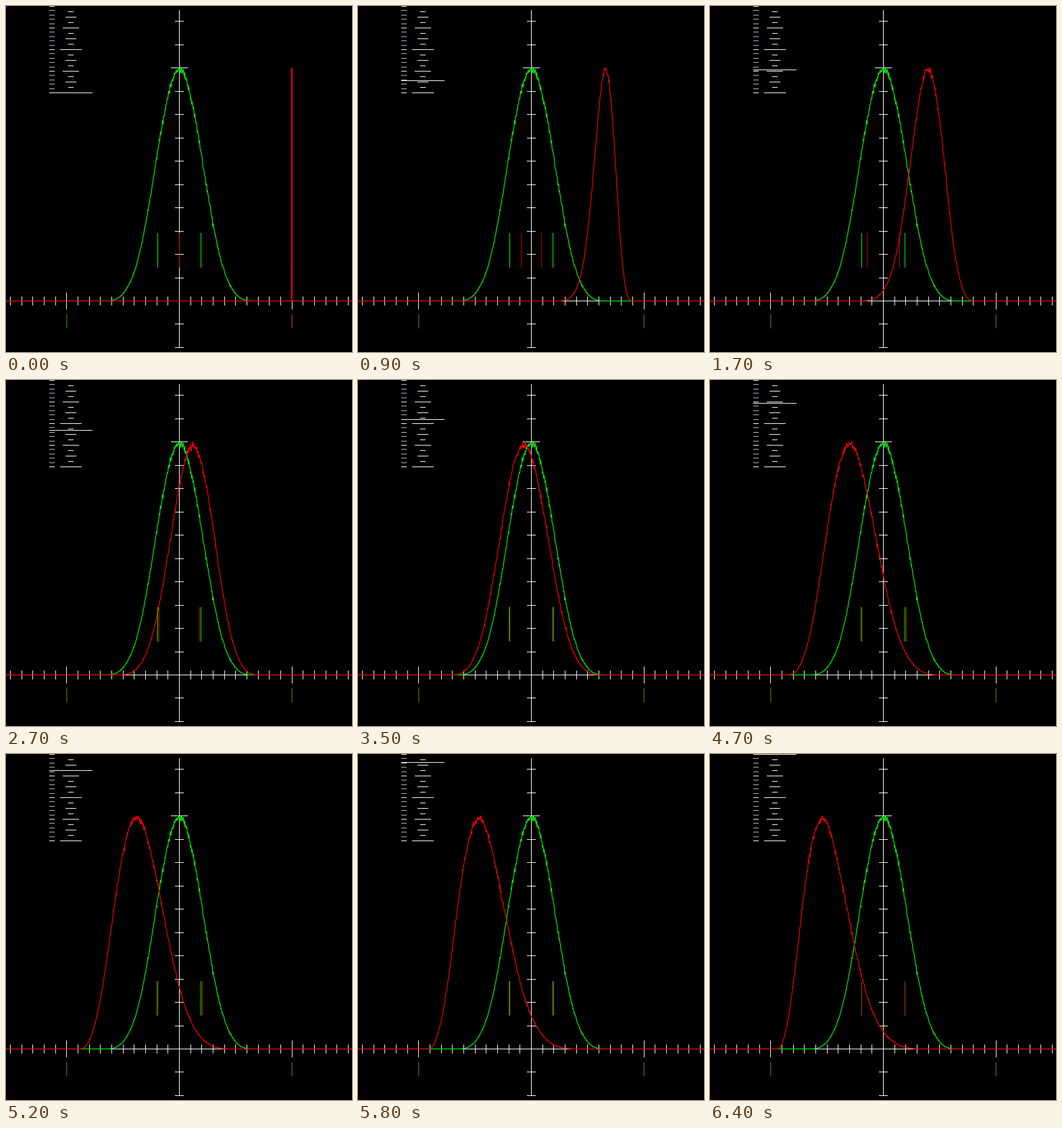
A matplotlib script for the animation above (6.5 s loop, 512 by 512 pixels).

```python
import numpy as np
import matplotlib.pyplot as plt
from matplotlib.animation import FuncAnimation

SIZE, STEPS = 512, 64
CX, BASE = 256.5, 436.5                # axis crossing, centre of a pixel
UNIT, HEIGHT = 500 / 3, 500 / 1.45     # pixels for 1.0 on each axis
WHITE, GREEN, RED = "#f2f2f2", "#00ee00", "#ee0000"
PALE = "#a8b0d0"
LINE = 0.72                            # one pixel at 100 dpi

plt.rcParams["path.snap"] = False

fig = plt.figure(figsize=(5.12, 5.12), dpi=100, facecolor="black")
ax = fig.add_axes([0, 0, 1, 1])
ax.set_xlim(0, SIZE)
ax.set_ylim(SIZE, 0)
ax.axis("off")


def line(xs, ys, color, **kw):
    return ax.plot(xs, ys, color=color, lw=LINE, solid_capstyle="butt", **kw)[0]


def hline(x0, x1, row, color=WHITE, **kw):
    return line([x0, x1], [row + 0.5] * 2, color, **kw)


def vline(col, y0, y1, color=WHITE, **kw):
    return line([col + 0.5] * 2, [y0, y1], color, **kw)


def draw_axes():
    hline(6, 507, 436)
    vline(256, 6, 506)
    for i in range(-15, 16):
        half = 12 if abs(i) == 10 else 6
        vline(int(CX + i * UNIT / 10), 436 - half, 437 + half)
    for i in range(-2, 13):
        half = 12 if i == 10 else 6
        hline(256 - half, 257 + half, int(BASE - i * HEIGHT / 10))


def draw_ruler():
    for i in range(21):
        hline(64, 72, round(i * 6.4), WHITE if i % 5 == 0 else PALE)
    for i in range(1, 17):
        half = 4 + 4 * sum(i % step == 0 for step in (2, 4, 8))
        hline(96 - half, 96 + half, i * 8)


def bell(s):
    """Density of a sum of four uniforms spanning 1/6 to 5/6, peak 1."""
    t = np.abs(s - 0.5) * 6
    outer = np.maximum(2 - t, 0) ** 3
    inner = np.maximum(1 - t, 0) ** 3
    return (outer - 4 * inner) / 4


xs = np.arange(0, SIZE + 0.5, 0.5)
value = (xs - CX + UNIT) / (2 * UNIT)
inside = (value > 0) & (value < 1)


def curve(power, seed):
    """Noisy histogram outline of s**power."""
    dens = np.zeros(len(xs))
    if power == 0:
        dens[np.argmin(abs(value - 0.999))] = 1
    else:
        s = value[inside] ** (1 / power)
        dens[inside] = bell(s) * s ** (1 - power)
        dens /= dens.max()
        noise = np.random.RandomState(seed).normal(0, 0.007, len(xs))
        dens = np.maximum(dens + noise * np.sqrt(dens), 0)
        dens /= dens.max()
    return BASE - HEIGHT * dens


grid = (np.arange(4000) + 0.5) / 4000
weight = bell(grid) / bell(grid).sum()


def spread(power):
    """Standard deviation of s**power in pixels."""
    p = grid ** power
    mean = (weight * p).sum()
    return 2 * UNIT * np.sqrt((weight * (p - mean) ** 2).sum())


draw_axes()
draw_ruler()
line(xs, curve(1, 500), GREEN).set_linewidth(0.85)
red = line(xs, xs, RED)
red.set_linewidth(0.85)

for col in (224, 288):
    vline(col, 336, 387, GREEN)
sides = [vline(256, 336, 387, RED, alpha=0.75) for _ in range(2)]

limits = (CX - UNIT - 0.5, CX + UNIT - 0.5)
for col in limits:
    vline(col, 456, 477, GREEN, alpha=0.75)
ends = [vline(col, 456, 477, RED, alpha=0.6) for col in limits]
slider = hline(64, 128, 128)


def update(n):
    power = n / (STEPS / 2)
    red.set_ydata(curve(power, n))

    off = spread(power)
    for side, sign in zip(sides, (-1, 1)):
        side.set_xdata([int(CX + sign * off) + 0.5] * 2)

    # at power zero both limits fall on the right
    ends[0].set_alpha(0.6 if n else 0)
    ends[1].set_alpha(0.6 if n else 0.84)
    slider.set_ydata([128.5 - 2 * n] * 2)
    return [red, slider, *sides, *ends]


anim = FuncAnimation(fig, update, frames=STEPS + 1, interval=100,
                     repeat=True, repeat_delay=0)
plt.show()
```
